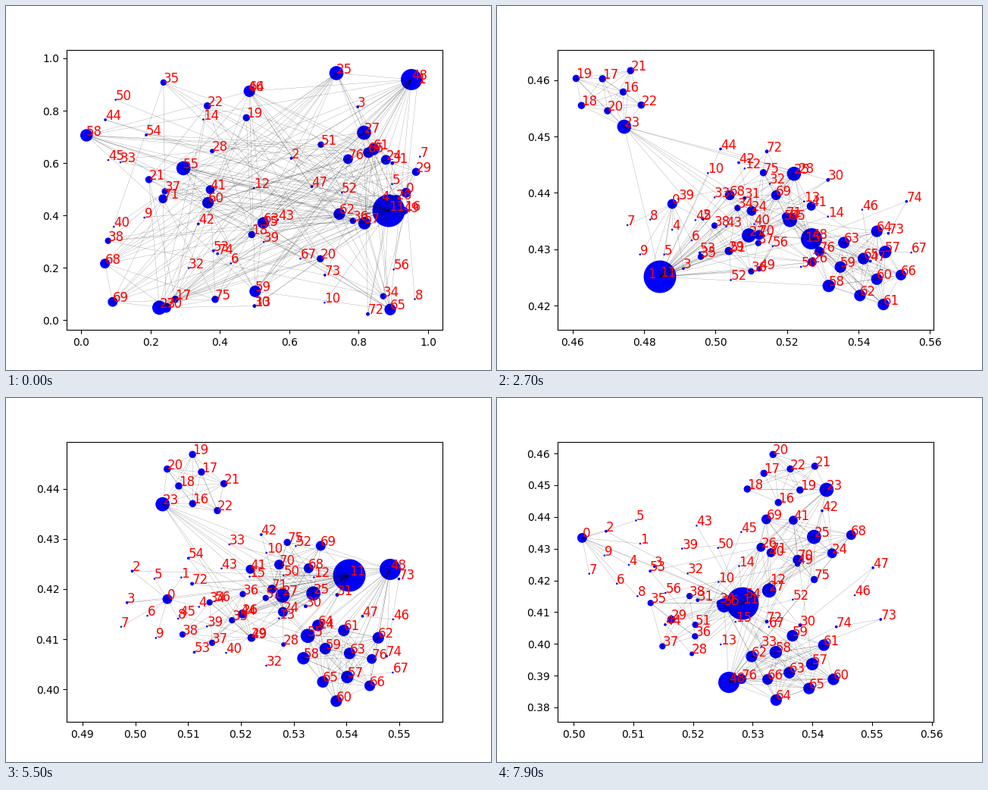
Animation, 640 px wide and 480 px high, one loop 8000 ms. Source, as a matplotlib script:

```python
from itertools import combinations

import numpy as np
import matplotlib.pyplot as plt
from matplotlib.animation import FuncAnimation
from matplotlib.collections import LineCollection

FRAMES, INTERVAL = 80, 100
N = 77
KEYS = np.array([0, 11, 27, 38, 55, 71, 79])
LOW, HIGH = (102.5, 74.4), (553.5, 410.4)
GOLDEN = np.pi * (3 - 5 ** 0.5)

# --- graph: close circles and the hubs that tie them together ---------------
COURT = [29, *range(34, 39)]
GANG = [25, 41, *range(68, 72), 75]
CLIQUES = [range(16, 24), range(23, 28), [11, *COURT], GANG,
           [48, *range(58, 67), 76]]
HUBS = {
    0: range(1, 10),
    11: [0, 2, 3, 10, *range(12, 16), *range(23, 39), 43, 44,
         *range(49, 52), 55, 58, *range(68, 73)],
    23: range(29, 32),
    24: [41, 42, *range(68, 71)],
    25: [*range(39, 43), 48],
    26: range(49, 56, 2),
    27: [*range(28, 32), 48, *range(68, 73)],
    28: [44, 45],
    46: [47],
    48: [47, 55, 57, *range(68, 76)],
    49: range(54, 57),
    51: range(52, 56),
    55: [41, *range(57, 66)],
    57: [41, *range(58, 68)],
    73: [74],
}
pairs = {p for c in CLIQUES for p in combinations(sorted(c), 2)}
pairs |= {tuple(sorted((a, b))) for a, bs in HUBS.items() for b in bs}
edges = np.array(sorted(pairs))
degree = np.bincount(edges.ravel(), minlength=N)

# --- motion, in stage pixels ------------------------------------------------
# the two largest nodes travel on their own paths, one point per key
PATHS = {
    11: [(505, 270), (358, 334), (215, 357), (376, 252), (453, 234), (140, 264), (324, 271)],
    48: [(535, 97), (502, 317), (415, 307), (533, 355), (507, 226), (476, 309), (306, 375)],
}
# members, radii, first and last centre of each drifting circle
CIRCLES = [
    (range(10), (60, 60), (225, 310), (165, 210)),
    (range(16, 24), (60, 46), (140, 120), (385, 105)),
    (COURT, (60, 50), (310, 310), (245, 285)),
    ([*range(57, 68), 76], (68, 60), (490, 345), (385, 350)),
    ([24, 42, *GANG], (65, 60), (350, 255), (405, 190)),
    ([46, 47, 73, 74], (45, 65), (510, 280), (480, 280)),
    ([26, 27, 55], (60, 60), (390, 310), (335, 250)),
]
placed = set(PATHS).union(*(c[0] for c in CIRCLES))
CIRCLES.append((sorted(set(range(N)) - placed), (115, 95), (345, 275), (300, 255)))

# x0, x1, y0, y1 of the axes at each key
VIEW = np.array([
    (-0.042, 1.0415, -0.038, 1.033),
    (0.3921, 0.5878, 0.4149, 0.4948),
    (0.4558, 0.5610, 0.4157, 0.4654),
    (0.4695, 0.5471, 0.3935, 0.4657),
    (0.4870, 0.5582, 0.3935, 0.4494),
    (0.5056, 0.5672, 0.3844, 0.4509),
    (0.4973, 0.5603, 0.3754, 0.4637),
])

rng = np.random.default_rng(4)


def sunflower(n):
    """n evenly spread points in the unit disc, shuffled and turned."""
    i = rng.permutation(n)
    angle = i * GOLDEN + rng.uniform(0, 2 * np.pi)
    r = np.sqrt((i + 0.5) / n)
    return np.column_stack([r * np.cos(angle), r * np.sin(angle)])


def key_poses():
    poses = np.empty((len(KEYS), N, 2))
    poses[0] = rng.uniform(LOW, HIGH, (N, 2))
    drift = ((KEYS - KEYS[1]) / (KEYS[-1] - KEYS[1])) ** 2
    for members, radii, first, last in CIRCLES:
        first, last = np.array(first), np.array(last)
        for k in range(1, len(KEYS)):
            centre = first + drift[k] * (last - first)
            spots = centre + sunflower(len(members)) * radii
            poses[k, list(members)] = np.clip(spots, LOW, HIGH)
    for node, path in PATHS.items():
        poses[:, node] = path
    return poses


POSES = key_poses()


def state(frame):
    """Node places in data units and the view limits."""
    k = min(np.searchsorted(KEYS, frame, side="right"), len(KEYS) - 1) - 1
    u = (frame - KEYS[k]) / (KEYS[k + 1] - KEYS[k])
    px = POSES[k] + u * (POSES[k + 1] - POSES[k])
    # the first stretch shrinks by a constant ratio
    w = (1 - 0.18 ** u) / 0.82 if k == 0 else u
    x0, x1, y0, y1 = view = VIEW[k] + w * (VIEW[k + 1] - VIEW[k])
    x = x0 + (px[:, 0] - 80) / 496 * (x1 - x0)
    y = y0 + (427.2 - px[:, 1]) / 369.6 * (y1 - y0)
    return np.column_stack([x, y]), view


# --- drawing ----------------------------------------------------------------
fig, ax = plt.subplots(figsize=(6.4, 4.8), dpi=100)
start, _ = state(0)
nodes = ax.scatter(*start.T, s=0.69 * degree ** 2, c="blue", zorder=1)
links = LineCollection(start[edges], colors="black", linewidths=0.1, zorder=2)
ax.add_collection(links)
labels = [ax.text(*p, str(i), color="red", fontsize=12, zorder=3)
          for i, p in enumerate(start)]


def update(frame):
    pos, (x0, x1, y0, y1) = state(frame)
    nodes.set_offsets(pos)
    links.set_segments(pos[edges])
    for label, p in zip(labels, pos):
        label.set_position(p)
    ax.set_xlim(x0, x1)
    ax.set_ylim(y0, y1)
    return [nodes, links, *labels]


anim = FuncAnimation(fig, update, frames=FRAMES, interval=INTERVAL,
                     repeat=True, repeat_delay=0, blit=False)
plt.show()
```
